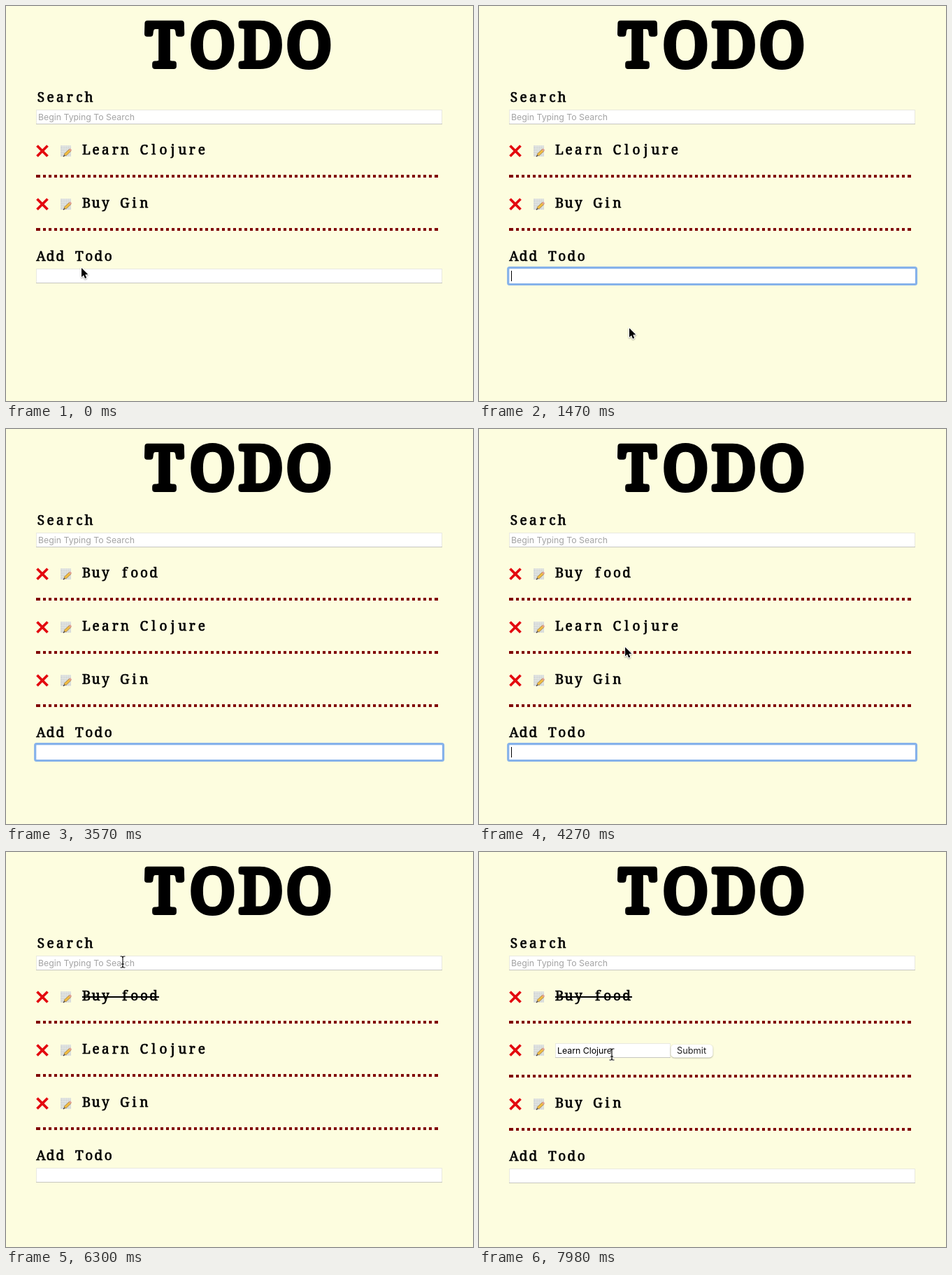
An HTML page with a canvas for the animation above (8 s loop, 668 by 564 pixels).

```html
<!DOCTYPE html>
<html lang="en">
<head>
<meta charset="utf-8">
<title>Todo list</title>
<style>
html, body { margin: 0; width: 100%; height: 100%; overflow: hidden; background: #fdfddf; }
canvas { display: block; }
</style>
</head>
<body>
<canvas id="stage" width="668" height="564"></canvas>
<script>
const ctx = document.getElementById('stage').getContext('2d');
const LOOP = 8000, PITCH = 13.75, ROW = 76;
const FOCUS = 350, SUBMIT = 3150, STRIKE = 4760, EDIT = 7140;
const TASK = 'Buy food';
const KEYS = [1890, 2030, 2170, 2240, 2380, 2450, 2590, 2730];
const HIDE = 1890, SHOW = 3850;

// pointer path: time, x, y
const PATH = [
  [0, 108, 374], [280, 122, 385], [420, 122, 385], [840, 215, 460],
  [3850, 215, 460], [4600, 205, 209], [4800, 205, 209], [5060, 216, 214],
  [5250, 216, 214], [6020, 167, 157], [6300, 167, 157],
  [7050, 85, 283], [7210, 85, 283], [7840, 190, 289], [8000, 190, 289]
];

function pointerAt(t) {
  const i = PATH.findIndex(p => p[0] > t);
  const [t0, x0, y0] = PATH[i - 1], [t1, x1, y1] = PATH[i];
  const u = (t - t0) / (t1 - t0), k = u * u * (3 - 2 * u);
  return [x0 + (x1 - x0) * k, y0 + (y1 - y0) * k];
}

function box(color, x, y, w, h) {
  ctx.fillStyle = color;
  ctx.fillRect(x, y, w, h);
}

function line(color, width, ...pts) {
  ctx.strokeStyle = color;
  ctx.lineWidth = width;
  ctx.beginPath();
  for (let i = 0; i < pts.length; i += 2) ctx.lineTo(pts[i], pts[i + 1]);
  ctx.stroke();
}

// one slab letter per fixed-width cell
function mono(text, x, y, pitch = PITCH) {
  ctx.textAlign = 'center';
  ctx.lineJoin = 'round';
  [...text].forEach((c, i) => {
    const cx = x + pitch * (i + .5);
    ctx.fillText(c, cx, y);
    ctx.strokeText(c, cx, y);
  });
}

function slab(text, x, mid) {
  ctx.font = '19px "Noto Serif", serif';
  ctx.fillStyle = ctx.strokeStyle = '#000';
  ctx.lineWidth = .7;
  mono(text, x, mid + 7);
}

function title() {
  ctx.font = '86px "Noto Serif", serif';
  ctx.fillStyle = ctx.strokeStyle = '#000';
  ctx.lineWidth = 8;
  mono('TODO', 192, 86, 69);
}

function label(text, x, y, color = '#000', size = 12.3) {
  ctx.font = size + 'px Inter, sans-serif';
  ctx.textAlign = 'left';
  ctx.fillStyle = color;
  ctx.fillText(text, x, y);
  return x + ctx.measureText(text).width;
}

function field(x, y, w) {
  box('#e9e9e0', x, y, w, 21);
  box('#fff', x + 1, y + 1, w - 2, 19);
  box('#c6c6c0', x, y + 20, w, 1);
}

function ring(y) {
  box('#fff', 43, y, 581, 21);
  ctx.strokeStyle = '#86b2ea';
  ctx.lineWidth = 3.2;
  ctx.beginPath();
  ctx.roundRect(41.7, y - 1.3, 583.8, 23.8, 2);
  ctx.stroke();
}

function cross(y) {
  line('#e3090f', 3.8, 44.5, y - 5.5, 59.5, y + 9.5);
  line('#e3090f', 3.8, 59.5, y - 5.5, 44.5, y + 9.5);
}

function memo(y) {
  box('#dcdfdc', 78, y - 6, 15, 16);
  for (let i = 0; i < 4; i++) {
    line('#c9cfd1', .7, 78, y - 2.5 + i * 3.4, 93, y - 2.5 + i * 3.4);
    line('#e8ebe9', .7, 81.5 + i * 3.2, y - 6, 81.5 + i * 3.2, y + 10);
  }
  line('#a5833f', 4.2, 84, y + 8, 92, y + .5);
  line('#f2bd43', 3, 84.5, y + 7.5, 91.5, y + 1);
  line('#e0a090', 3.2, 91, y + 1.5, 93, y - .5);
  line('#4c4030', 1.6, 82, y + 10, 84, y + 8);
}

// square dots with a solid corner at each end
function dots(y) {
  box('#800000', 43, y, 4, 4);
  for (let x = 45; x < 618; x += 8) box('#800000', x, y, 4, 4);
  box('#800000', 614, y, 4, 4);
}

function arrow(x, y) {
  ctx.save();
  ctx.translate(x, y);
  ctx.shadowColor = 'rgba(0,0,0,.35)';
  ctx.shadowBlur = 2;
  ctx.shadowOffsetY = 1;
  ctx.beginPath();
  [[0, 0], [0, 13], [3, 10.3], [5, 15], [7.2, 14], [5.2, 9.5], [9.3, 9.3]]
    .forEach(p => ctx.lineTo(...p));
  ctx.closePath();
  ctx.lineWidth = 2;
  ctx.strokeStyle = '#fff';
  ctx.stroke();
  ctx.shadowColor = 'transparent';
  ctx.fillStyle = '#000';
  ctx.fill();
  ctx.restore();
}

function beam(x, y) {
  for (const [color, w] of [['rgba(255,255,255,.7)', 2.6], ['#111', 1.2]]) {
    line(color, w, x, y - 7, x, y + 7);
    line(color, w, x - 3.5, y - 8, x - 1, y - 8, x, y - 6.5, x + 1, y - 8, x + 3.5, y - 8);
    line(color, w, x - 3.5, y + 8, x - 1, y + 8, x, y + 6.5, x + 1, y + 8, x + 3.5, y + 8);
    line(color, w, x - 2, y + 3, x + 2, y + 3);
  }
}

function caretOn(t) {
  if (t < 420 || t >= STRIKE) return false;
  return t < 3570 || t >= 4070 && t < 4570;
}

function draw(t) {
  box('#fdfddf', 0, 0, 668, 564);
  title();
  const hot = [[43, 148, 581, 21]];   // areas with a text pointer
  slab('Search', 43, 130);
  field(43, 148, 581);
  label('Begin Typing To Search', 46, 163, '#a4a4a4');

  const items = ['Learn Clojure', 'Buy Gin'];
  if (t >= SUBMIT) items.unshift(TASK);
  let y = 205;
  items.forEach((text, i) => {
    const width = text.length * PITCH;
    cross(y);
    memo(y);
    if (t >= EDIT && i === 1) {
      field(109, y - 8, 165);
      label(text, 112, y + 7);
      ctx.save();
      ctx.shadowColor = 'rgba(0,0,0,.35)';
      ctx.shadowBlur = 2;
      ctx.shadowOffsetY = .7;
      ctx.fillStyle = '#fff';
      ctx.beginPath();
      ctx.roundRect(274.5, y - 6, 60, 18.5, 5);
      ctx.fill();
      ctx.restore();
      label('Submit', 283, y + 7, '#222', 12.8);
      hot.push([109, y - 8, 165, 21]);
      y++;
    } else {
      slab(text, 108, y);
      if (text === TASK && t >= STRIKE) box('#000', 109, y + 1, width, 2);
      hot.push([108, y - 13, width, 26]);
    }
    dots(y + 36);
    y += ROW;
  });

  slab('Add Todo', 43, y);
  const top = y + 18;
  field(43, top, 581);
  if (t >= FOCUS && t < STRIKE) ring(top);
  const typed = t < SUBMIT ? TASK.slice(0, KEYS.filter(k => k <= t).length) : '';
  const end = label(typed, 46, top + 15);
  if (caretOn(t)) box('#000', Math.round(end + .4), top + 3, 1, 15);
  hot.push([43, top, 581, 21]);

  if (t < HIDE || t >= SHOW) {
    const [px, py] = pointerAt(t);
    const overText = hot.some(([x, y, w, h]) => px >= x && px <= x + w && py >= y && py <= y + h);
    (overText ? beam : arrow)(px, py);
  }
}

const start = performance.now();
function frame() {
  draw((performance.now() - start) % LOOP);
  requestAnimationFrame(frame);
}
frame();
</script>
</body>
</html>
```
